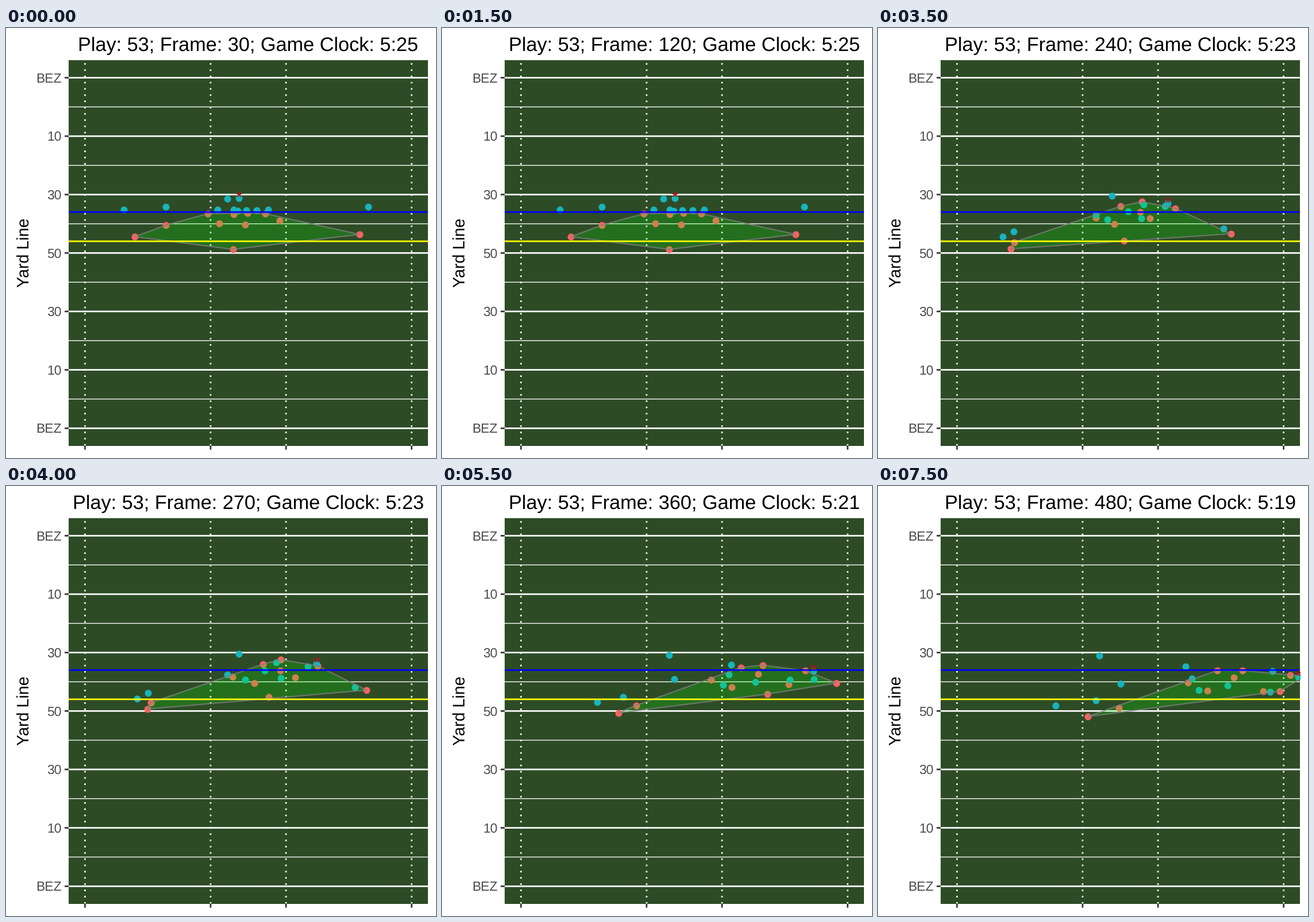
A matplotlib script for the animation above (8000 ms loop, 748 by 748 pixels).

```python
import matplotlib.pyplot as plt
import numpy as np
from matplotlib.animation import FuncAnimation
from matplotlib.patches import Polygon, Rectangle

SIZE, DPI = 748, 100
FRAMES, INTERVAL = 16, 500
PT = 72 / DPI
LEFT, RIGHT, TOP, BOTTOM = 109, 734, 56, 726.5
FIRST_YARD, YARD_STEP = 86.5, 101.63
CENTER_X, HASH_OFFSETS = 421.5, (-284.1, -65.6, 65.6, 284.1)
GRID = 2.716
SNAP, HANDOFF, TURN, WHISTLE = 3, 5, 8, 15

plt.rcParams["font.family"] = "Liberation Sans"
plt.rcParams["text.hinting"] = "none"


def hermite(u, start, end, v0, v1):
    """Cubic from start to end; v0 and v1 are velocities per unit of u."""
    u = u[:, None]
    return (start + (end - start) * u * u * (3 - 2 * u)
            + v0 * u * (1 - u) ** 2 - v1 * u * u * (1 - u))


def route(stance, turn, finish, end_pace=0.4):
    """Hold the stance, accelerate through the turn, ease off to the finish."""
    stance, turn, finish = np.array([stance, turn, finish], float)
    t = np.arange(FRAMES)
    pace = 1.15 * (finish - turn)
    break_time, chase_time = TURN - SNAP, WHISTLE - TURN
    burst = hermite(np.clip((t - SNAP) / break_time, 0, 1), stance, turn,
                    0, pace * break_time / chase_time)
    chase = hermite((t - TURN) / chase_time, turn, finish, pace, end_pace * (finish - turn))
    return np.where(t[:, None] < TURN, burst, chase)


def convex_hull(points):
    points = sorted(map(tuple, points))

    def chain(pts):
        out = []
        for p in pts:
            while len(out) > 1 and ((out[-1][0] - out[-2][0]) * (p[1] - out[-2][1])
                                    <= (out[-1][1] - out[-2][1]) * (p[0] - out[-2][0])):
                out.pop()
            out.append(p)
        return out[:-1]

    return chain(points) + chain(points[::-1])


receivers = [
    route((205, 316), (228, 370), (309, 382)),
    route((278, 311), (247, 360), (379, 373)),
    route((368, 316), (385, 328), (422, 344)),
    route((630, 311), (607, 350), (686, 322)),
]
blockers = [
    route((396, 316), (416, 337), (558, 355)),
    route((403, 318), (450, 321), (546, 335)),
    route((418, 317), (478, 334), (608, 347)),
    route((436, 317), (525, 314), (682, 358)),
    route((456, 316), (470, 307), (535, 314)),
]
quarterback = route((405, 296), (405, 292), (385, 295))
runner = route((385, 297), (540, 309), (731, 332), end_pace=0)
rushers = [
    route((351, 323), (447, 310), (590, 321)),
    route((396, 324), (394, 332), (539, 342)),
    route((420, 322), (477, 321), (619, 333)),
    route((451, 323), (478, 302), (634, 321)),
]
linebackers = [
    route((371, 340), (432, 343), (573, 356)),
    route((416, 342), (503, 333), (699, 357)),
    route((476, 335), (542, 313), (717, 329)),
]
secondary = [
    route((224, 363), (246, 388), (365, 401)),
    route((278, 343), (252, 377), (419, 386)),
    route((395, 385), (457, 367), (670, 357)),
    route((615, 359), (627, 355), (742, 331)),
]
offense = np.array(receivers + blockers + [quarterback, runner])
defense = np.array(rushers + linebackers + secondary)

fig = plt.figure(figsize=(SIZE / DPI, SIZE / DPI), dpi=DPI, facecolor="white")
ax = fig.add_axes([0, 0, 1, 1])
ax.set(xlim=(0, SIZE), ylim=(SIZE, 0))
ax.axis("off")
field = ax.add_patch(Rectangle((LEFT, TOP), RIGHT - LEFT, BOTTOM - TOP, fc="#2d4c26", lw=0, zorder=0))


def line(xs, ys, color, width=GRID, zorder=1, **style):
    ax.plot(xs, ys, color=color, lw=width * PT, zorder=zorder, snap=False,
            solid_capstyle="butt", dash_capstyle="butt", **style)


def across(y, color, width=GRID, zorder=1):
    line((LEFT, RIGHT), (y, y), color, width, zorder)


for i, label in enumerate(("BEZ", "10", "30", "50", "30", "10", "BEZ")):
    y = FIRST_YARD + i * YARD_STEP
    across(y, "white")
    if i < 6:
        across(y + YARD_STEP / 2, "white", GRID / 2)
    line((LEFT - 7, LEFT), (y, y), "#333333")
    ax.text(96.3, y + 8, label, size=22.9 * PT, color="#4d4d4d", ha="right", va="baseline")
for offset in HASH_OFFSETS:
    x = CENTER_X + offset
    line((x, x), (BOTTOM, TOP), "white", linestyle=(0, (1, 3)))
    line((x, x), (BOTTOM, BOTTOM + 7), "#333333")
across(320.2, "#0000ff", zorder=5)
across(371, "#ffff00", zorder=5)

ax.text(39.8, 391.2, "Yard Line", size=28.6 * PT, rotation=90,
        rotation_mode="anchor", ha="center", va="baseline")
title = ax.text(421.1, 39.7, "", size=34.3 * PT, ha="center", va="baseline")


def dots(color, zorder):
    return ax.plot([], [], "o", color=color, ms=12 * PT, mew=0, zorder=zorder)[0]


defenders = dots("#ff625f", 2)
attackers = dots("#18b4bd", 3)
hull = ax.add_patch(Polygon([(0, 0)] * 3, fc=(0, 1, 0, 0.2), ec=(0.5, 0.5, 0.5, 0.75),
                            lw=2.2 * PT, zorder=4))
ball, = ax.plot([], [], marker=(5, 2, 0), color="#a01a1c", ms=10 * PT, mew=1.7 * PT, zorder=6)
for artist in (defenders, attackers, hull, ball):
    artist.set_clip_path(field)


def update(i):
    attackers.set_data(*offense[:, i].T)
    defenders.set_data(*defense[:, i].T)
    hull.set_xy(convex_hull(defense[:, i]))
    x, y = (quarterback if i < HANDOFF else runner)[i]
    ball.set_data([x], [y - 6.8])
    second = 25 - max(0, (i - SNAP) // 2)
    title.set_text(f"Play: 53; Frame: {30 * (i + 1)}; Game Clock: 5:{second}")
    return attackers, defenders, hull, ball, title


anim = FuncAnimation(fig, update, frames=FRAMES, interval=INTERVAL, repeat=True, repeat_delay=0)
plt.show()
```
